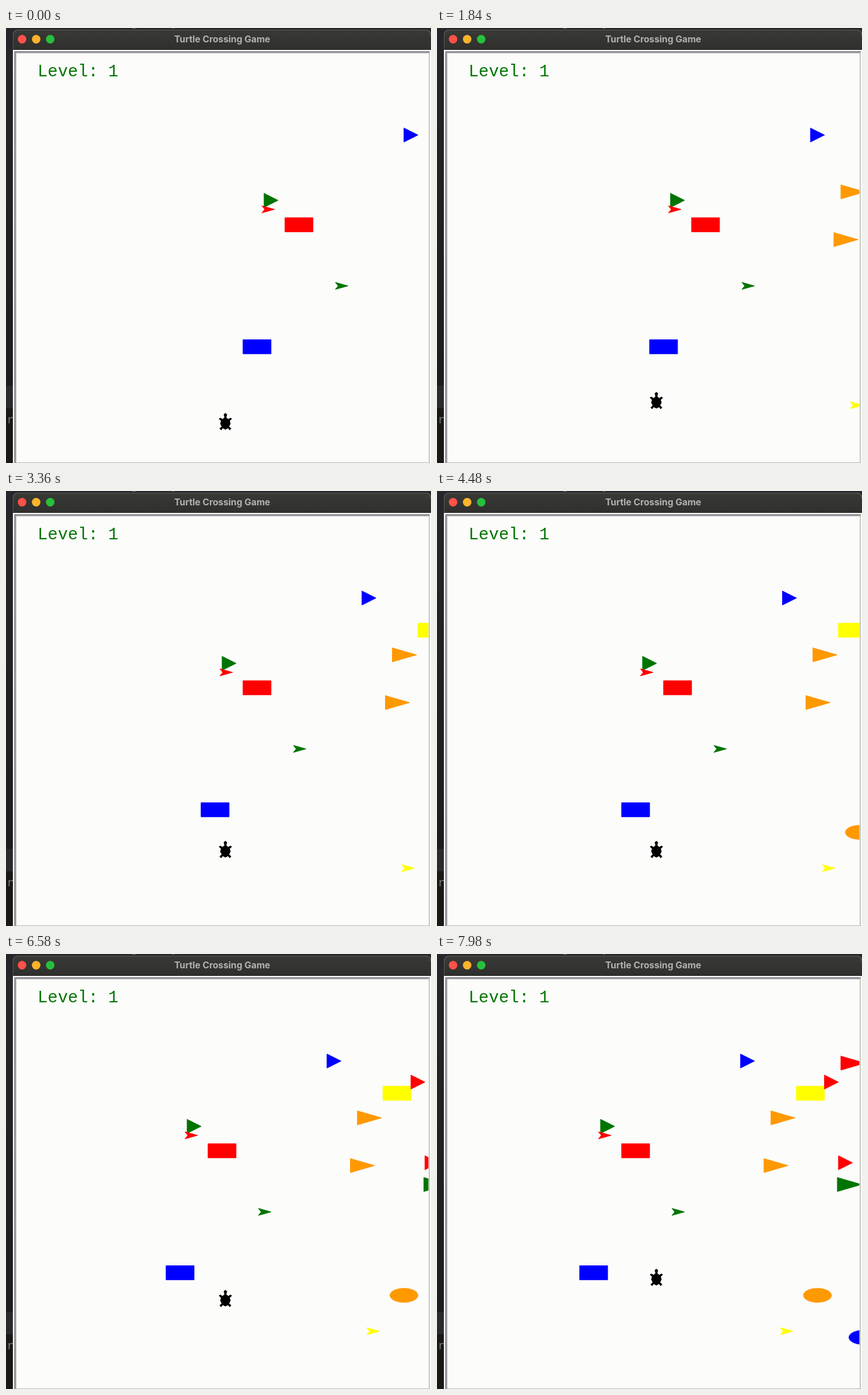
Write an HTML page that moves like this. It is 740 by 756 pixels and loops after 8000 ms.

```html
<!DOCTYPE html>
<html lang="en">
<head>
<meta charset="utf-8">
<title>Turtle Crossing Game</title>
<style>
  html, body { margin: 0; width: 100%; height: 100%; overflow: hidden; background: #1f1f21; }
  svg { display: block; width: 740px; height: 756px; }
  .title { font: 700 15.8px Inter, "Open Sans", sans-serif; fill: #b3b2ae; text-anchor: middle; }
  .level { font: 29.3px "Liberation Mono", "Courier New", monospace; fill: #007500; white-space: pre; }
  .code { font: 20px "DejaVu Sans Mono", monospace; fill: #77777a; }
  .shape { stroke-width: 1; vector-effect: non-scaling-stroke; }
</style>
</head>
<body>
<svg viewBox="0 0 740 756">
  <defs>
    <linearGradient id="bar" x2="0" y2="1">
      <stop offset="0" stop-color="#393936"/>
      <stop offset="1" stop-color="#2f2f2d"/>
    </linearGradient>
    <linearGradient id="desk" x2="0" y2="1">
      <stop offset="0" stop-color="#27272b"/>
      <stop offset="1" stop-color="#1b1b1c"/>
    </linearGradient>
    <clipPath id="field"><rect x="18" y="43" width="717.5" height="713"/></clipPath>
  </defs>

  <!-- Desktop behind the window -->
  <rect width="740" height="756" fill="url(#desk)"/>
  <rect y="622" width="12" height="39" fill="#2a2b2d"/>
  <rect y="661" width="12" height="95" fill="#1c1815"/>
  <text class="code" x="-11" y="687">er</text>
  <path d="M220 .5h6" stroke="#77777a"/>
  <path d="M289 .5h4" stroke="#a8652f"/>

  <!-- Window -->
  <path d="M12 756V13Q12 3 22 3H730Q740 3 740 13V756Z" fill="#fdfdfd"/>
  <path d="M12 38V13Q12 3 22 3H730Q740 3 740 13V38Z" fill="url(#bar)"/>
  <path d="M12.5 38V13Q12.5 3.5 22 3.5H730Q739.5 3.5 739.5 13" fill="none" stroke="#5c5c5a"/>
  <path d="M12 37.5H740" stroke="#1c1c1b"/>
  <circle cx="28" cy="19.5" r="7.4" fill="#ff5149"/>
  <circle cx="52.5" cy="19.5" r="7.4" fill="#fdb42a"/>
  <circle cx="77" cy="19.5" r="7.4" fill="#27c03c"/>
  <text class="title" x="376.5" y="24.5">Turtle Crossing Game</text>

  <!-- Sunken canvas border -->
  <path d="M15.5 756V41.5H738" fill="none" stroke="#6f6f72" stroke-width="2"/>
  <path d="M17.5 756V43.5H736" fill="none" stroke="#a3a3ab" stroke-width="1.5"/>
  <path d="M737 42V756" stroke="#c4c3bb" stroke-width="2"/>
  <path d="M18 755.5H738" stroke="#b5b5b2"/>
  <rect x="18" y="44" width="717.5" height="711" fill="#fcfcfb"/>

  <text class="level" x="55" y="84">Level: 1</text>
  <g id="cars" clip-path="url(#field)"></g>
  <g id="turtle"><path class="shape" stroke="#000" transform="scale(1.22 -1.22)"
    d="M0 16L-2 14-1 10-4 7-7 9-9 8-6 5-7 1-5-3-8-6-6-8-4-5 0-7 4-5 6-8 8-6 5-3 7 1 6 5 9 8 7 9 4 7 1 10 2 14Z"/></g>
</svg>
<script>
const LOOP = 8000, UNIT = 1.22, STRIDE = 5 * UNIT - 0.01, START_X = 741.6;

const SHAPES = {
  square: 'M-10-10H10V10H-10Z',
  arrow: 'M0-10L10 0 0 10Z',
  triangle: 'M-5.77-10L11.55 0-5.77 10Z',
  classic: 'M0 0L-9-5-7 0-9 5Z',
  circle: 'M-10 0A10 10 0 0 1 10 0A10 10 0 0 1-10 0Z'
};
const COLORS = { red: '#f00', blue: '#00f', green: '#007400', orange: '#f90', yellow: '#ff0' };

// shape, colour, y, game tick at which the car enters
const CARS = [
  ['square', 'blue', 554, -50],
  ['arrow', 'green', 299.5, -48],
  ['classic', 'red', 315.2, -45],
  ['square', 'red', 342, -38],
  ['classic', 'green', 448.2, -24],
  ['arrow', 'blue', 186, -8],
  ['triangle', 'orange', 367.7, 1],
  ['triangle', 'orange', 284.8, 3],
  ['classic', 'yellow', 655.6, 7],
  ['square', 'yellow', 242, 12],
  ['circle', 'orange', 593.2, 14],
  ['arrow', 'red', 222.6, 16],
  ['arrow', 'red', 362.8, 20],
  ['triangle', 'green', 400.6, 22],
  ['triangle', 'red', 189.6, 23],
  ['circle', 'blue', 666.3, 27]
];

// Times of the game ticks, and the ticks on which the turtle walks
const TICKS = [140, 420, 720, 1000, 1240, 1540, 1840, 2080, 2420, 2780, 3060, 3360, 3640, 3920,
  4200, 4500, 4880, 5160, 5480, 5720, 6000, 6300, 6700, 6980, 7260, 7580, 7820];
const WALKS = [3, 5, 7, 9, 11, 17, 20, 24, 25, 26];

const NS = 'http://www.w3.org/2000/svg';
const layer = document.getElementById('cars');
const turtle = document.getElementById('turtle');

const cars = CARS.map(([shape, color, y, born]) => {
  const group = document.createElementNS(NS, 'g');
  const path = document.createElementNS(NS, 'path');
  path.setAttribute('class', 'shape');
  path.setAttribute('d', SHAPES[shape]);
  path.setAttribute('fill', COLORS[color]);
  path.setAttribute('stroke', COLORS[color]);
  path.setAttribute('transform', `scale(${2 * UNIT} ${UNIT})`);
  group.append(path);
  layer.append(group);
  return { group, y, born };
});

const place = (el, x, y) => el.setAttribute('transform', `translate(${x} ${y})`);

function draw(time) {
  const tick = TICKS.filter(t => t <= time).length;
  for (const { group, y, born } of cars) {
    group.style.display = tick < born ? 'none' : '';
    place(group, START_X - (tick - born) * STRIDE, y);
  }
  const walked = WALKS.filter(t => t <= tick).length;
  place(turtle, 382, 688.9 - walked * 10 * UNIT);
}

const begin = performance.now();
function frame() {
  draw((performance.now() - begin) % LOOP);
  requestAnimationFrame(frame);
}
frame();
</script>
</body>
</html>
```
